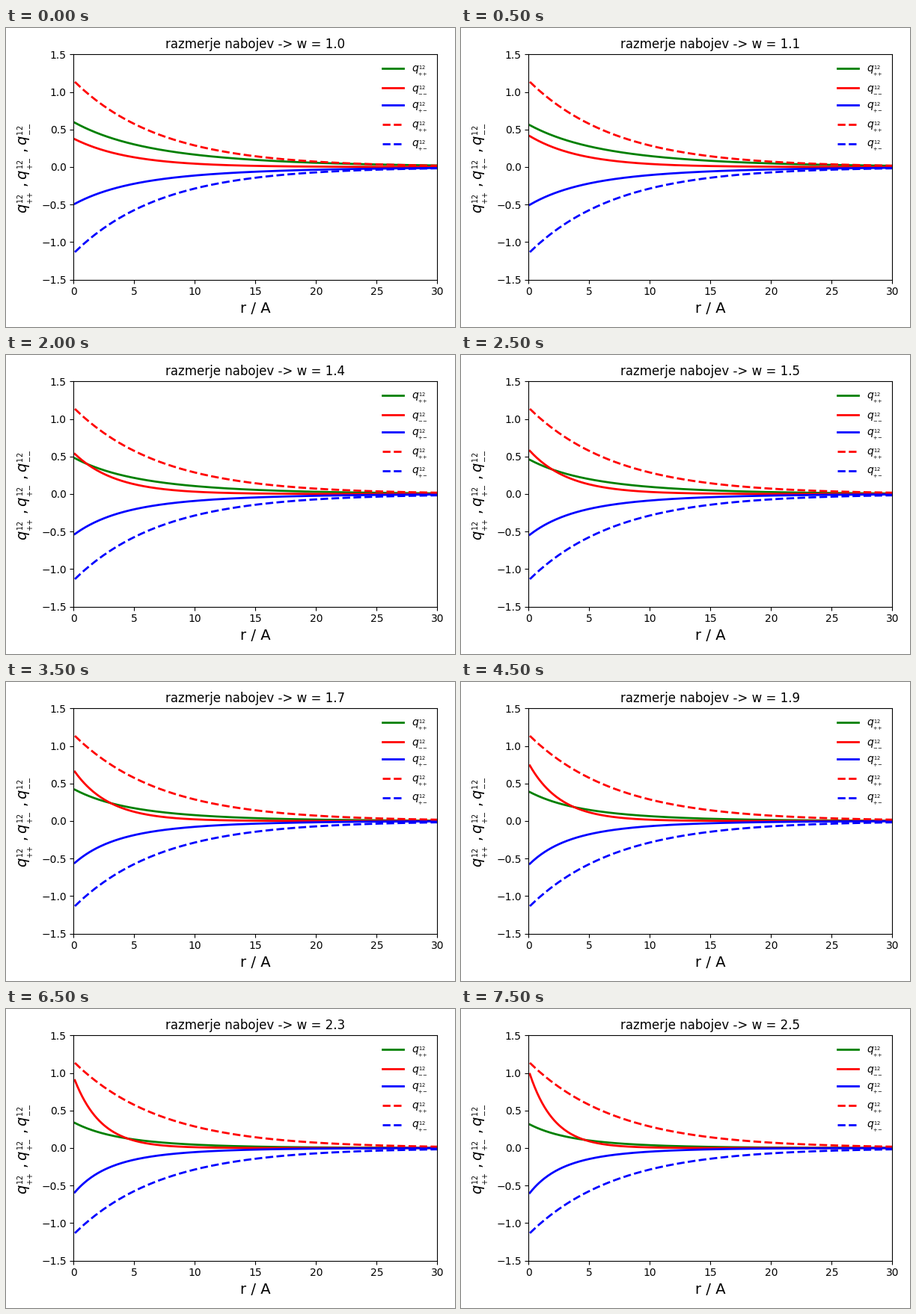
A matplotlib script that plays this animation: 600 by 400 pixels, repeating every 8 s.

```python
import numpy as np
import matplotlib.pyplot as plt
from matplotlib.animation import FuncAnimation

W, H, DPI = 600, 400, 100
FRAMES, INTERVAL = 16, 500

plt.rcParams["text.kerning_factor"] = 6  # whole-pixel kerning

r = np.linspace(0.1, 30, 300)
x = r - 0.1


def q(signs):
    a, b = signs
    return r"q_{_{{%s}{%s}}}^{_{12}}" % (a, b)


def two_modes(u, a, ka, b, kb):
    """Sum of two decays, scaled to 1 at u = 0."""
    return (a * np.exp(-ka * u) + b * np.exp(-kb * u)) / (a + b)


def q_pp(w):
    return two_modes(x * (1 + 0.52 * (w - 1)), 0.40, 0.10, 0.19, 0.25) / (w + 0.695)


def q_mm(w):
    return (0.41 * w - 0.04) * np.exp(-(0.215 + 0.183 * (w - 1)) * x)


def q_pm(w):
    amp = 0.72 - 0.39 / (w + 0.695)
    return -amp * two_modes(x * (1 + 0.62 * (w - 1)), 0.26, 0.10, 0.235, 0.26)


fig = plt.figure(figsize=(W / DPI, H / DPI), dpi=DPI, facecolor="white")
ax = fig.add_axes([90.4 / W, 63.4 / H, 485.9 / W, 301.3 / H])
ax.set_xlim(0, 30)
ax.set_ylim(-1.5, 1.5)
ax.set_xlabel("r / A", fontsize=14)
fig.text(29 / W, 213 / H, "$" + r"\ , ".join(map(q, ("++", "+-", "--"))) + "$",
         fontsize=14, rotation=90, rotation_mode="anchor", ha="center", va="baseline")
title = ax.set_title("", fontsize=12)

curves = []
for func, color, signs in ((q_pp, "green", "++"), (q_mm, "red", "--"), (q_pm, "blue", "+-")):
    line, = ax.plot(r, func(1.0), color=color, lw=2, label=f"${q(signs)}$")
    curves.append((line, func))

limit = 1.15 * np.exp(-0.139 * r)
ax.plot(r, limit, "--", color="red", lw=2, label=f"${q('++')}$")
ax.plot(r, -limit, "--", color="blue", lw=2, label=f"${q('+-')}$")
ax.legend(loc="upper right", frameon=False, fontsize=10)


def update(i):
    w = 1 + 0.1 * i
    title.set_text(f"razmerje nabojev -> w = {w:.1f}")
    for line, func in curves:
        line.set_ydata(func(w))
    return [title] + [line for line, _ in curves]


anim = FuncAnimation(fig, update, frames=FRAMES, interval=INTERVAL, repeat=True,
                     repeat_delay=0, blit=False)
plt.show()
```
